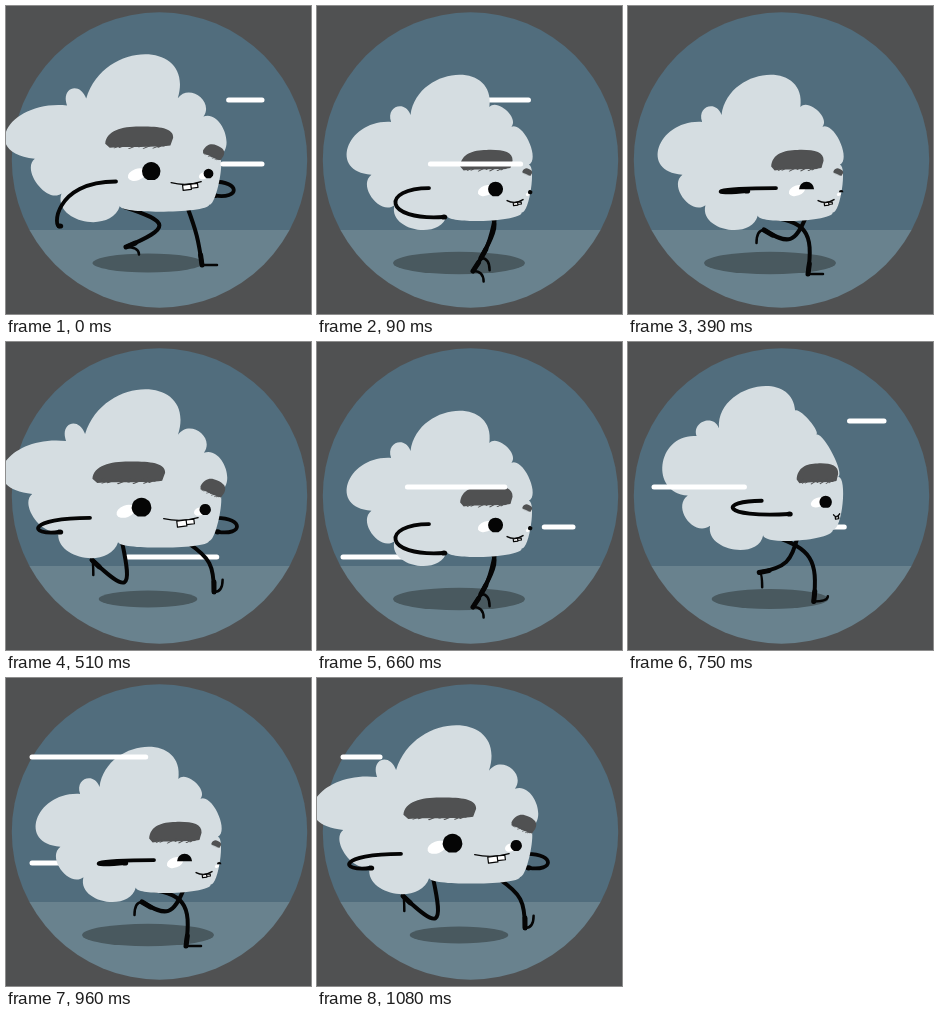
An HTML page with a canvas for the animation above (1.14 s loop, 305 px wide and 308 px high).

```html
<!DOCTYPE html>
<html lang="en">
<head>
<meta charset="utf-8">
<title>Running cloud</title>
<style>
html, body { margin: 0; width: 100%; height: 100%; overflow: hidden; background: #505152; }
canvas { display: block; }
</style>
</head>
<body>
<canvas id="stage" width="305" height="308"></canvas>
<script>
const ctx = document.getElementById('stage').getContext('2d');
const LOOP = 1140, STRIDE = 570, STEP = 30;
const INK = '#050505', CLOUD = '#d5dde1', GRAY = '#505152';

// Cloud lobes seen from the front and the side: start x, y, bulge, skew
const cloud = {
  front: [[79,92,.65,.2], [172,93,.63,0], [198,111,.47,0], [213,150,.14,0], [203,199,.09,0],
    [112,200,.5,.05], [53,187,.4,0], [26,152,.85,-.42], [60,99,.95,0]],
  side: [[91,82,.53,.07], [166,62,.12,0], [187,87,.12,0], [210,130,.18,0], [205,184,.16,0],
    [137,190,.47,0], [84,181,.55,0], [62,151,.63,0], [68,90,.62,0]]
};

// Face parts, front and side: x, y, size
const face = {
  brow: [[119,131,38,12], [194,128,20,11]],
  farBrow: [[207,146,13,9], [212,138,0,0]],
  white: [[116,170,10], [195,156,7.5]],
  eye: [[132,166,10], [202,156,6]],
  farEye: [[198,168,6], [222,160,0]],
  mouth: [[173,178,18], [211,170,2]]
};

// Limb keys: near arm (shoulder x, elbow x, hand x, y), legs (ankle x, y, toe angle)
const keys = [
  { at: 0, arm: [110, 47, 54, 220], near: [120, 241, 30], far: [196, 259, 0] },
  { at: 90, arm: [112, 65, 127, 211], near: [164, 252, 55], far: [156, 265, 45] },
  { at: 210, arm: [141, 100, 173, 159], near: [193, 262, -45], far: [123, 219, 90] },
  { at: 300, arm: [145, 103, 169, 154], near: [195, 262, -30], far: [122, 218, 90] },
  { at: 390, arm: [148, 80, 119, 185], near: [180, 268, 0], far: [136, 224, 120] },
  { at: 510, arm: [84, 21, 54, 190], near: [86, 218, 85], far: [208, 250, -55] }
];
keys.push({ ...keys[0], at: STRIDE });

// Speed lines: y, start, time the tail takes
const backLines = [[94, 1111, 315], [185, 635, 330], [215, 393, 300]];
const frontLines = [[158, 1106, 290], [145, 516, 290], [79, 720, 360]];

const clamp = v => Math.max(0, Math.min(1, v));
const lerp = (a, b, k) => a + (b - a) * k;
const blend = (a, b, k) => a.map((v, i) => lerp(v, b[i], k));

// The run turns the cloud once per stride and squashes it at both steps.
function motionAt(t) {
  const angle = 2 * Math.PI * (t - 240) / STRIDE;
  const turn = (1 + Math.cos(angle)) / 2, dip = Math.sin(angle) ** 4;
  const squash = ([x, y, ...rest]) => [lerp(x, 215, .07 * dip), lerp(y, 400, .07 * dip), ...rest];
  return { turn, dip, squash, look: turn ** .6, lift: Math.abs(Math.sin(angle)) };
}

function limbsAt(t) {
  const i = keys.findIndex(k => k.at > t), a = keys[i - 1], b = keys[i];
  const k = (t - a.at) / (b.at - a.at);
  return { arm: blend(a.arm, b.arm, k), near: blend(a.near, b.near, k), far: blend(a.far, b.far, k) };
}

function ellipse(x, y, rx, ry, color, tilt = 0) {
  ctx.fillStyle = color;
  ctx.beginPath();
  ctx.ellipse(x, y, rx, ry, tilt, 0, 7);
  ctx.fill();
}

function pen(width, color = INK) {
  ctx.lineWidth = width;
  ctx.strokeStyle = color;
  ctx.beginPath();
}

function drawLines(lines, t) {
  for (const [y, start, span] of lines) {
    const age = (t - start + LOOP) % LOOP;
    const head = 256 - 230 * clamp(age / 200), tail = 256 - 230 * clamp((age - 58) / span);
    if (tail - head < 1) continue;
    pen(5, '#fff');
    ctx.moveTo(head, y);
    ctx.lineTo(tail, y);
    ctx.stroke();
  }
}

function drawArm(x, y, elbow, handX, handY) {
  pen(3.8);
  ctx.moveTo(x, y);
  ctx.bezierCurveTo(elbow, y, elbow, handY + 4, handX, handY);
  ctx.stroke();
  ellipse(handX, handY, 3.2, 2.6, INK);
}

// Two equal segments; the knee always points forward.
function drawLeg([hx, hy], [x, y, toe], segment) {
  const dx = x - hx, dy = y - hy, d = Math.hypot(dx, dy);
  const bend = 1.3 * Math.sqrt(Math.max(0, segment ** 2 - d * d / 4)) / d;
  const kx = (hx + x) / 2 + dy * bend, ky = (hy + y) / 2 - dx * bend;
  const soft = .85, shin = Math.hypot(kx - x, ky - y);
  pen(4);
  ctx.moveTo(hx, hy);
  ctx.bezierCurveTo(lerp(hx, kx, soft), lerp(hy, ky, soft), lerp(x, kx, soft), lerp(y, ky, soft), x, y);
  ctx.stroke();
  pen(5);
  ctx.moveTo(x, y);
  ctx.lineTo(lerp(x, kx, 10 / shin), lerp(y, ky, 10 / shin));
  ctx.stroke();
  const a = toe * Math.PI / 180, tx = x + 15 * Math.cos(a), ty = y + 15 * Math.sin(a);
  pen(2.5);
  ctx.moveTo(x, y);
  ctx.quadraticCurveTo(tx, y, tx, ty);
  ctx.stroke();
}

function drawCloud({ turn, squash }) {
  const lobes = cloud.front.map((lobe, i) => squash(blend(lobe, cloud.side[i], turn)));
  ctx.fillStyle = CLOUD;
  ctx.beginPath();
  ctx.moveTo(lobes[0][0], lobes[0][1]);
  lobes.forEach(([x, y, bulge, skew], i) => {
    const [nx, ny] = lobes[(i + 1) % lobes.length];
    const dx = nx - x, dy = ny - y;
    const ox = dy * bulge + dx * skew, oy = -dx * bulge + dy * skew;
    ctx.bezierCurveTo(x + ox, y + oy, nx + ox, ny + oy, nx, ny);
  });
  ctx.fill();
}

function drawBrow([x, y, rx, ry], tilt) {
  if (rx < 1) return;
  ctx.save();
  ctx.translate(x, y);
  ctx.rotate(tilt);
  ctx.scale(rx, ry);
  ctx.fillStyle = GRAY;
  ctx.beginPath();
  ctx.moveTo(-.98, .5);
  ctx.bezierCurveTo(-.95, -.6, -.5, -.95, 0, -.95);
  ctx.bezierCurveTo(.6, -1, 1, -.8, .98, 0);
  ctx.lineTo(.9, .65);
  ctx.bezierCurveTo(.4, .85, -.4, .7, -.85, .85);
  ctx.fill();
  pen(.06, GRAY);
  for (let u = -.85; u < .8; u += .14) {
    const v = .8 + .12 * Math.sin(u * 17);
    ctx.moveTo(u, v);
    ctx.lineTo(u + .2, v - .25);
  }
  ctx.stroke();
  ctx.restore();
}

function drawPupil([x, y, r], lid) {
  const quarter = Math.PI / 2;
  ctx.fillStyle = INK;
  ctx.beginPath();
  ctx.arc(x, y, r, quarter * (1 + lid), quarter * (5 - lid));
  ctx.fill();
}

function drawMouth([x, y, w]) {
  const size = Math.max(3, w * .5);
  ctx.save();
  ctx.translate(x, y);
  pen(1.4);
  ctx.moveTo(-w, -1);
  ctx.quadraticCurveTo(0, 3, w, -2);
  ctx.stroke();
  ctx.rotate(-.12);
  ctx.fillStyle = '#fff';
  pen(1.2);
  ctx.rect(-size * .5, 1, size * 1.1, size * .7);
  if (w > 4) ctx.rect(size * .6, 1, size * .9, size * .55);
  ctx.fill();
  ctx.stroke();
  ctx.restore();
}

function drawFace({ look, dip, squash }, t) {
  const part = name => squash(blend(...face[name], look));
  const lid = .25 + .75 * clamp(1 - Math.abs(t - 390) / 60);
  const [wx, wy, wr] = part('white'), [fx, fy, fr] = part('farEye');
  ctx.save();
  ctx.translate(0, 7 * dip);
  ellipse(wx, wy, wr, wr * .6, '#fff', -.35);
  drawPupil(part('eye'), lid);
  if (fr > .5) {
    ellipse(fx - fr, fy + 2, fr, fr * .7, '#fff', -.35);
    drawPupil([fx, fy, fr], lid);
  }
  drawMouth(part('mouth'));
  drawBrow(part('brow'), 0);
  drawBrow(part('farBrow'), .45);
  ctx.restore();
}

function drawScene() {
  ctx.fillStyle = GRAY;
  ctx.fillRect(0, 0, 305, 308);
  ctx.save();
  ctx.beginPath();
  ctx.arc(153.5, 154, 147.7, 0, 7);
  ctx.clip();
  ctx.fillStyle = '#516d7d';
  ctx.fillRect(0, 0, 305, 224);
  ctx.fillStyle = '#69828e';
  ctx.fillRect(0, 224, 305, 84);
  ctx.restore();
}

function draw(t) {
  const phase = t % STRIDE, run = motionAt(phase), limbs = limbsAt(phase);
  const { turn, squash } = run;
  const hip = (front, side) => squash([lerp(front, side, turn), lerp(201, 190, turn)]);
  const shoulder = squash([0, lerp(176, 154, turn)])[1];
  const width = 46 + 20 * run.lift, tuck = 60 * turn;

  drawScene();
  ellipse(142, 257, width, width * .17, '#49595f');
  ctx.lineCap = ctx.lineJoin = 'round';
  drawLines(backLines, t);
  drawLeg(hip(182, 168), limbs.far, 30);
  drawLeg(hip(116, 146), limbs.near, 46);
  drawArm(211 - tuck, shoulder, 238 - tuck, 212 - tuck, shoulder + 14);
  drawCloud(run);
  drawFace(run, phase);
  const [x, ...arm] = limbs.arm;
  drawArm(x, shoulder, ...arm);
  drawLines(frontLines, t);
}

const begin = performance.now();
function tick() {
  const t = (performance.now() - begin) % LOOP;
  draw(Math.min(Math.floor(t / STEP) * STEP, LOOP - 2 * STEP));
  requestAnimationFrame(tick);
}
tick();
</script>
</body>
</html>
```
